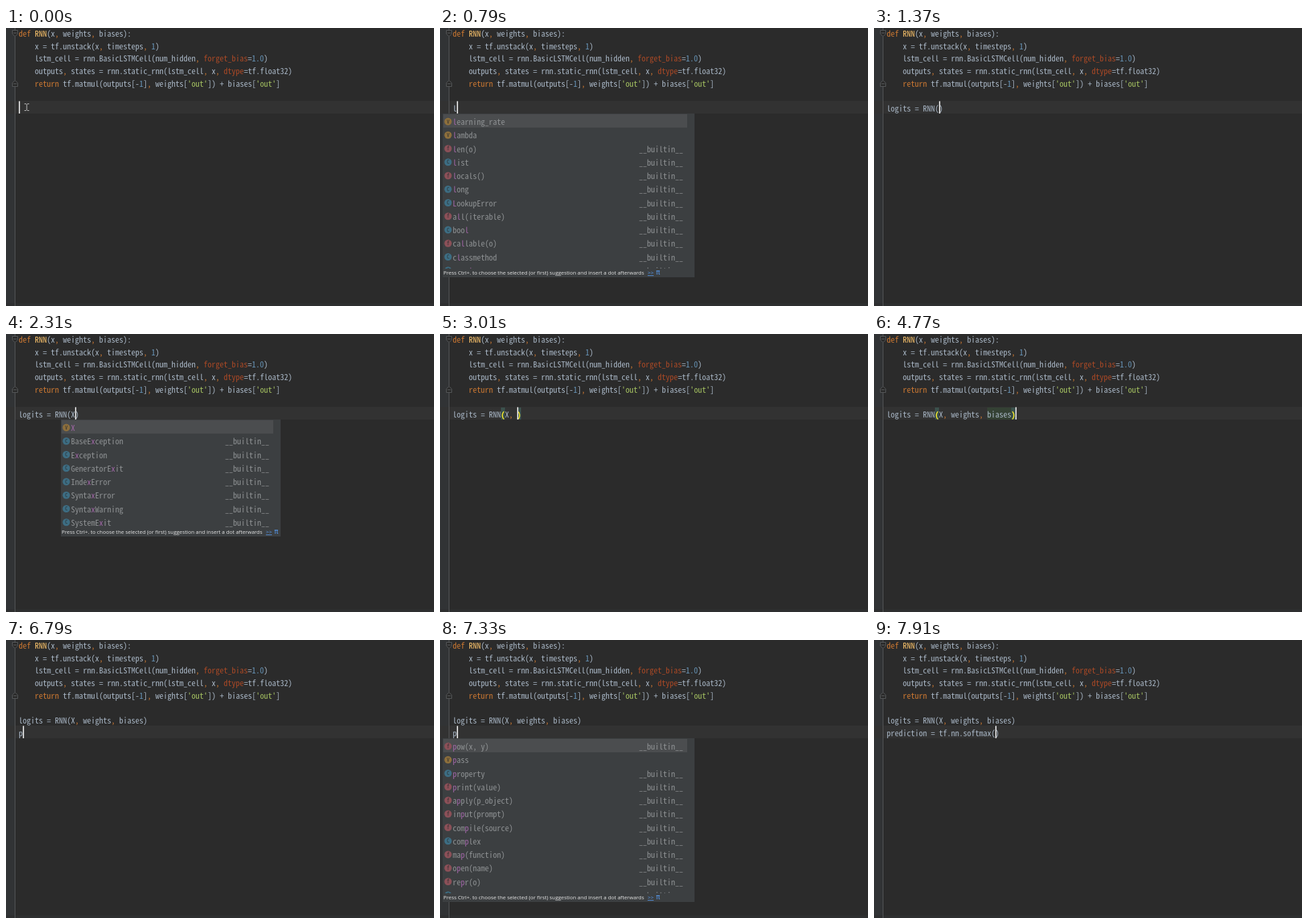
An HTML page for the animation above (8 s loop, 639x416 px).

```html
<!DOCTYPE html>
<html lang="en">
<head>
<meta charset="utf-8">
<title>Code editor</title>
<style>
  html, body { margin: 0; width: 100%; height: 100%; overflow: hidden; background: #2b2b2b; }
  svg { display: block; }
  text { white-space: pre; fill: #a9b7c6; }
  .item { fill: #8f9294; }
  .hint { fill: #e6e6e6; }
  .link { fill: #589df6; }
</style>
</head>
<body>
<svg id="stage" width="639" height="416" viewBox="0 0 639 416">
  <rect width="639" height="416" fill="#2b2b2b"/>
  <rect width="13" height="416" fill="#313335"/>
  <rect y="412" width="639" height="4" fill="#2e2f30"/>
  <g id="under"></g>
  <path d="M13.5 0V416" stroke="#555759"/>
  <g fill="#2b2b2b" stroke="#56585a">
    <path d="M9.5 3.5H17.5V9L13.5 12.5L9.5 9Z M11 7.5H16"/>
    <path d="M9.5 87.5H17.5V82L13.5 78.5L9.5 82Z M11 83.5H16"/>
  </g>
  <g id="code"></g>
  <g id="live"></g>
</svg>
<script>
const LOOP = 8000, LEFT = 19, CH = 6, ROW = 20.25, FOOT = 13;
const MONO = '"Noto Sans Mono CJK SC", "Noto Sans Mono CJK JP", "Liberation Mono", monospace';
const SANS = '"Open Sans", "Noto Sans", sans-serif';
const HINT = 'Press Ctrl+. to choose the selected (or first) suggestion and insert a dot afterwards';
const $ = id => document.getElementById(id);

// Font size at which the given text has the wanted width
const pen = document.createElement('canvas').getContext('2d');
function sizeFor(family, text, width) {
  pen.font = `100px ${family}`;
  return 100 * width / pen.measureText(text).width;
}
const monoSize = sizeFor(MONO, '0000000000', CH * 10);
const hintSize = sizeFor(SANS, HINT, 300);
$('stage').style.font = `${monoSize}px ${MONO}`;

const HEAD = [
  'def RNN(x, weights, biases):',
  '    x = tf.unstack(x, timesteps, 1)',
  '    lstm_cell = rnn.BasicLSTMCell(num_hidden, forget_bias=1.0)',
  '    outputs, states = rnn.static_rnn(lstm_cell, x, dtype=tf.float32)',
  "    return tf.matmul(outputs[-1], weights['out']) + biases['out']"
];
const CALL = 'logits = RNN(X, weights, biases)';

// Completion entries: icon letter, then label
const lists = {
  x: ['v X', 'c BaseException', 'c Exception', 'c GeneratorExit', 'c IndexError',
      'c SyntaxError', 'c SyntaxWarning', 'c SystemExit'],
  w: ['p weights=', 'v weights', 'c memoryview', 'f pow(x, y)', 'f raw_input(prompt)'],
  l: ['v learning_rate', 'f len(o)', 'c list', 'f locals()', 'c long', 'c LookupError',
      'f all(iterable)', 'c bool', 'f callable(o)', 'c classmethod', 'c complex', 'f delattr(o, name)'],
  p: ['f pow(x, y)', 'c property', 'f print(value)', 'f apply(p_object)', 'f input(prompt)',
      'f compile(source)', 'c complex', 'f map(function)', 'f open(name)', 'f repr(o)',
      'c super', 'f zip(seq1)']
};
const insert = (list, item) => [list[0], item, ...list.slice(1)];
lists.w2 = [...lists.w, 'c BytesWarning', 'c DeprecationWarning'];
lists.l2 = insert(lists.l, 'v lambda');
lists.l3 = insert(lists.l2, 'v label');
lists.p2 = insert(lists.p, 'v pass');

// start, line, text, caret column (-1 = hidden), extras
const steps = [
  [0, 6, '', 0, { mouse: true }],
  [70, 6, '', -1, { mouse: true }],
  [380, 6, 'l', 1],
  [480, 6, 'l', 1, { list: 'l', from: 0 }],
  [790, 6, 'l', 1, { list: 'l2', from: 0 }],
  [860, 6, 'l', 1, { list: 'l3', from: 0 }],
  [1140, 6, 'l', -1, { list: 'l3', from: 0 }],
  [1370, 6, 'logits = RNN()', 13],
  [2310, 6, 'logits = RNN(X)', 14, { list: 'x', from: 13 }],
  [2710, 6, 'logits = RNN(X,)', 15],
  [3010, 6, 'logits = RNN(X, )', 16, { braces: [12, 16] }],
  [3420, 6, 'logits = RNN(X, w)', 17],
  [3500, 6, 'logits = RNN(X, w)', 17, { list: 'w', from: 16 }],
  [3730, 6, 'logits = RNN(X, w)', 17, { list: 'w2', from: 16 }],
  [4160, 6, 'logits = RNN(X, weights)', 23],
  [4240, 6, 'logits = RNN(X, weights,)', 24],
  [4770, 6, CALL, 32, { braces: [12, 31], usage: [25, 6] }],
  [5090, 7, '', 0],
  [5640, 7, '', -1],
  [6180, 7, '', 0],
  [6640, 7, '', -1],
  [6790, 7, 'p', 1],
  [6880, 7, 'p', 1, { list: 'p', from: 0 }],
  [7330, 7, 'p', 1, { list: 'p2', from: 0 }],
  [7680, 7, 'p', -1, { list: 'p2', from: 0 }],
  [7910, 7, 'prediction = tf.nn.softmax()', 27]
];

const colX = col => LEFT + col * CH;
const baseY = line => Math.round(12 + 18.7 * line) + 0.5;
const topY = line => 109 + (line - 6) * 19;
const rect = (x, y, w, h, fill) => `<rect x="${x}" y="${y}" width="${w}" height="${h}" fill="${fill}"/>`;
const text = (x, y, body, attrs = '') => `<text x="${x}" y="${y}" ${attrs}>${body}</text>`;
const tint = (s, fill) => `<tspan fill="${fill}">${s}</tspan>`;

const TOKENS = /('[^']*')|(\bdef\b|\breturn\b|,)|((?<=def )RNN)|(forget_bias|dtype)|(\b\d[\d.]*)/g;
const COLORS = ['#a5c261', '#cc7832', '#ffc66d', '#aa4926', '#6897bb'];
const paint = s => s.replace(TOKENS, (m, ...g) => tint(m, COLORS[g.findIndex((v, i) => i < 5 && v)]));
const codeLine = (line, s) => text(LEFT, baseY(line), paint(s));

const ICONS = { v: '#8d6f3c', p: '#8d6f3c', c: '#3d6d83', f: '#8b5058' };

function entry(item, i, width, key) {
  const kind = item[0], label = item.slice(2), y = 12 + i * ROW;
  const shown = label.replace(new RegExp(key, 'i'), m => tint(m, '#a066a6'));
  const tail = kind === 'c' || kind === 'f'
    ? text(width - 17 - 11 * CH, y + 5, '__builtin__', 'class="item"') : '';
  return `<circle cx="8" cy="${y}" r="5.5" fill="${ICONS[kind]}"/>`
    + text(8, y + 2.6, kind === 'f' ? 'f' : kind.toUpperCase(),
        'text-anchor="middle" style="font-size:7.5px;fill:#2b2d2f"')
    + text(15, y + 5, shown, 'class="item"') + tail;
}

function popup(name, col, line) {
  const items = lists[name], long = items.length > 10;
  const w = long ? 376 : 328, h = long ? 245 : items.length * ROW + FOOT;
  const x = colX(col) - 15, y = topY(line) + 19, foot = h - 4;
  const font = `font:${hintSize}px ${SANS.replace(/"/g, "'")}`;
  return `<svg x="${x}" y="${y}" width="${w}" height="${h}">`
    + rect(0, 0, w, h, '#3c3f41') + rect(1, 1, w - 12, 20, '#4b4d4f')
    + items.map((item, i) => entry(item, i, w, name[0])).join('')
    + rect(0, h - FOOT, w, FOOT, '#3c3f41')
    + `<g style="${font}">` + text(1, foot, HINT, 'class="hint"')
    + text(306, foot, '&gt;&gt;', 'class="link" text-decoration="underline"')
    + text(318.5, foot, 'π', `class="link" style="font:10px 'DejaVu Sans', sans-serif"`) + '</g></svg>';
}

const beam = '<path d="M27.5 113.5H30L31 114.5L32 113.5H34.5M31 114.5V122.5M27.5 123.5H30L31 122.5L32 123.5H34.5" fill="none" stroke="#c4c4c4"/>';

function draw([, line, body, caret, { list, from, braces, usage, mouse } = {}]) {
  const y = topY(line);
  $('under').innerHTML = rect(0, y, 639, 19, '#323232');
  let out = '';
  if (usage) out += rect(colX(usage[0]), y + 1, usage[1] * CH, 18, '#344134');
  if (braces) out += braces.map(c => rect(colX(c), y + 1, CH, 18, '#3b514d')).join('');
  if (line === 7) out += codeLine(6, CALL);
  if (braces) {
    const [a, b] = braces, mark = c => `<tspan fill="#ffef28" font-weight="bold">${body[c]}</tspan>`;
    out += text(LEFT, baseY(line), paint(body.slice(0, a)) + mark(a) + paint(body.slice(a + 1, b)) + mark(b));
  } else out += codeLine(line, body);
  if (caret >= 0) out += rect(colX(caret), y + 0.5, 2, 18.5, '#cfcfcf');
  if (mouse) out += beam;
  if (list) out += popup(list, from, line);
  $('live').innerHTML = out;
}

$('code').innerHTML = HEAD.map((s, i) => codeLine(i, s)).join('');

const start = performance.now();
let current;
function tick() {
  const t = (performance.now() - start) % LOOP;
  const step = steps.findLast(s => s[0] <= t);
  if (step !== current) draw(current = step);
  requestAnimationFrame(tick);
}
tick();
</script>
</body>
</html>
```
